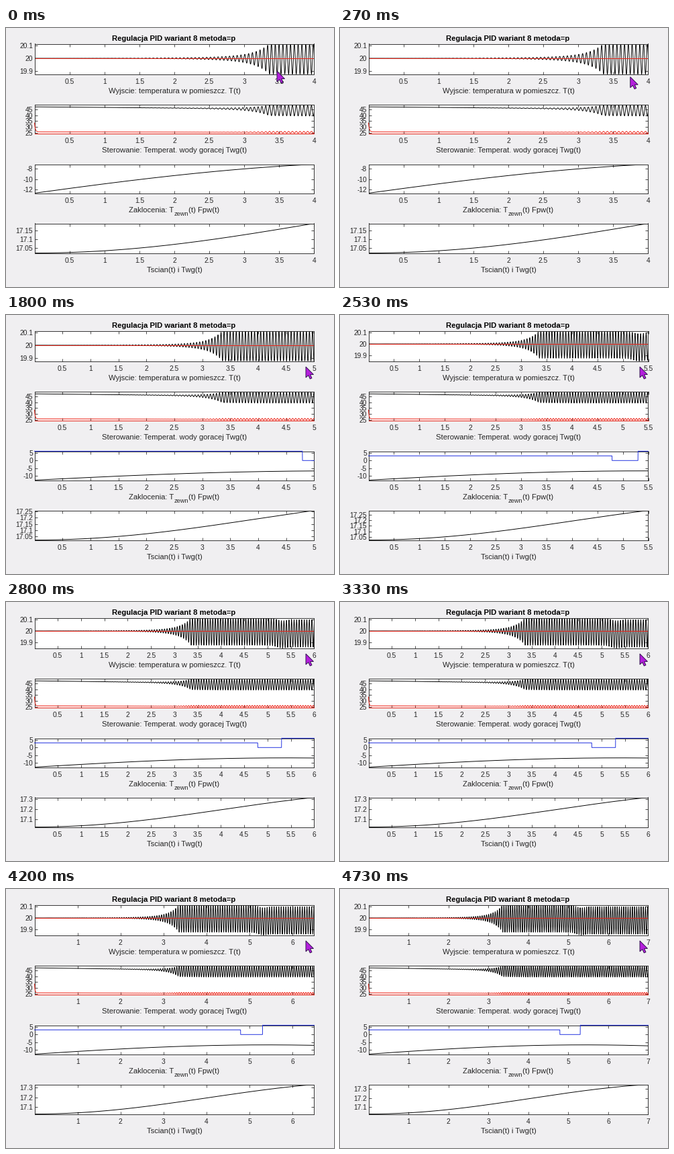
A matplotlib script for the animation above (4990 ms loop, 489 by 385 pixels).

```python
import numpy as np
import matplotlib.pyplot as plt
from matplotlib.animation import FuncAnimation
from matplotlib.patches import Polygon

W, H, DPI = 489, 385, 64
PX = 72 / DPI
LOOP, FRAMES = 4990, 75
INK, BACK, RED, BLUE = "#262626", "#f0eff1", "#ec2014", "#2030e0"
LEFT, RIGHT = 42.5, 459.5
MIDDLE = (LEFT + RIGHT) / 2

SPAN_TIMES = [400, 1270, 2000, 2800, 3670, 4730]  # ms, each adds half a unit
POINTER_TIMES = [70, 130, 270, 400]
POINTER_FROM, POINTER_TO = np.array([404, 64]), np.array([447, 77])
FLOW_OFF, FLOW_ON = 4.79, 5.3

plt.rcParams["font.family"] = "Liberation Sans"
fig = plt.figure(figsize=(W / DPI, H / DPI), dpi=DPI, facecolor=BACK)

# Overlay in pixel coordinates for captions and the pointer
over = fig.add_axes([0, 0, 1, 1], zorder=10)
over.set(xlim=(0, W), ylim=(H, 0))
over.axis("off")


def caption(x, y, text, size=11.25, ha="center", color=INK, **kw):
    over.text(x, y, text, fontsize=size * PX, ha=ha, va="baseline", color=color, **kw)


def make_axes(top, bottom, label=""):
    ax = fig.add_axes([LEFT / W, 1 - bottom / H, (RIGHT - LEFT) / W, (bottom - top) / H])
    ax.tick_params(direction="in", top=True, right=True, length=4 * PX, width=0.8 * PX,
                   color=INK, labelcolor=INK, labelsize=10.2 * PX)
    ax.tick_params(axis="x", pad=6.4 * PX)
    ax.tick_params(axis="y", pad=2.6 * PX)
    for spine in ax.spines.values():
        spine.set(linewidth=0.9 * PX, color=INK)
    caption(MIDDLE, bottom + 28.5, label)
    return ax


def make_line(ax, color="black", **kw):
    return ax.plot([], [], color=color, lw=0.95 * PX, **kw)[0]


output = make_axes(23.5, 68.5, "Wyjscie: temperatura w pomieszcz. T(t)")
control = make_axes(113.5, 156.5, "Sterowanie: Temperat. wody goracej Twg(t)")
outdoor = make_axes(202.5, 245.5)
wall = make_axes(290.5, 334.5, "Tscian(t) i Twg(t)")
caption(MIDDLE - 0.5, 19.3, "Regulacja PID wariant 8 metoda=p", color="black", weight="bold")
caption(183, 274, "Zaklocenia: T", ha="left")
caption(250.5, 279, "zewn", size=9.2, ha="left")
caption(272.5, 274, "(t) Fpw(t)", ha="left")

on_top = dict(clip_on=False, zorder=5)
temp, setpoint = make_line(output), make_line(output, RED)
water = make_line(control)
valve, floor = make_line(control, RED, **on_top), make_line(control, RED, **on_top)
weather, flow = make_line(outdoor), make_line(outdoor, BLUE, **on_top)
wall_temp = make_line(wall)

ARROW = np.array([(0, 0), (0, 16), (3.8, 12.6), (6.3, 18), (9, 16.8), (6.6, 11.6), (11.5, 11.5)])
pointer = over.add_patch(Polygon(ARROW, facecolor="#b41fdc", edgecolor="#2a1048", lw=0.9 * PX))


def passed(times, ms):
    return sum(ms + 20 >= start for start in times)


def growth(t):
    x = np.minimum(t - 3.36, 0)
    return 0.35 * np.exp(1.8 * x) + 0.65 * np.exp(5.5 * x)


def swing(t):
    return 0.12 * growth(t) * np.sin(2 * np.pi * ((t - 4) / 0.0545 + 0.47))


def room(t):
    sag = 0.005 + 0.017 / (1 + np.exp((5.2 - t) / 0.08))
    dip = 0.012 * np.exp(-((t - FLOW_ON) / 0.12) ** 2)
    return 20 + swing(t) - growth(t) * (sag + dip)


def hot_water(t):
    return 47.2 - 0.5 * np.minimum(t, 4) - 1.3 * growth(t) - 38 * swing(t)


def valve_level(t):
    return 25.9 - 0.1 * np.minimum(t, 3) + 7.5 * np.exp(-t / 0.012) - 6 * swing(t)


def outside(t):
    return -6.7 - 7.1 * (1 - np.cos(2 * np.pi / 24 * (5.4 - t)))


def wall_heat(t):
    return 17.022 + 0.172 * (1 - np.cos(0.39 * t))


def set_ticks(axis, step, low, high):
    ticks = np.arange(np.ceil(low / step), np.floor(high / step + 1e-6) + 1) * step
    axis.set_ticks(ticks, [f"{v:g}" for v in np.round(ticks, 4)])


def set_range(ax, low, high, step):
    ax.set_ylim(low, high)
    set_ticks(ax.yaxis, step, low, high)


def update(i):
    ms = i * LOOP / FRAMES
    end = 4 + 0.5 * passed(SPAN_TIMES, ms)
    t = np.linspace(0, end, int(end * 500) + 1)

    for ax in (output, control, outdoor, wall):
        ax.set_xlim(0, end)
        set_ticks(ax.xaxis, 0.5 if end <= 6 else 1, 0.1, end)

    inside = room(t)
    temp.set_data(t, inside)
    setpoint.set_data([0, end], [20, 20])
    set_range(output, inside.min(), inside.max(), 0.1)

    water.set_data(t, hot_water(t))
    valve.set_data(t, valve_level(t))
    floor.set_data([0, end], [24.7, 24.7])
    set_range(control, 24.7, 49.3, 5)

    weather.set_data(t, outside(t))
    flow_seen = end > FLOW_OFF
    start_flow = 3 if end > FLOW_ON else 6
    flow.set_data(t, np.where(t < FLOW_OFF, start_flow, np.where(t < FLOW_ON, 0, 6)))
    flow.set_visible(flow_seen)
    set_range(outdoor, outside(0), 6 if flow_seen else outside(end), 5 if flow_seen else 2)

    wall_temp.set_data(t, wall_heat(t))
    set_range(wall, wall_heat(0), wall_heat(end), 0.05 if end < 6 else 0.1)

    progress = (passed(POINTER_TIMES, ms) / len(POINTER_TIMES)) ** 1.4
    pointer.set_xy(ARROW + POINTER_FROM + progress * (POINTER_TO - POINTER_FROM))
    return []


anim = FuncAnimation(fig, update, frames=FRAMES, interval=LOOP / FRAMES,
                     init_func=lambda: update(0), repeat=True, repeat_delay=0, blit=False)
plt.show()
```
